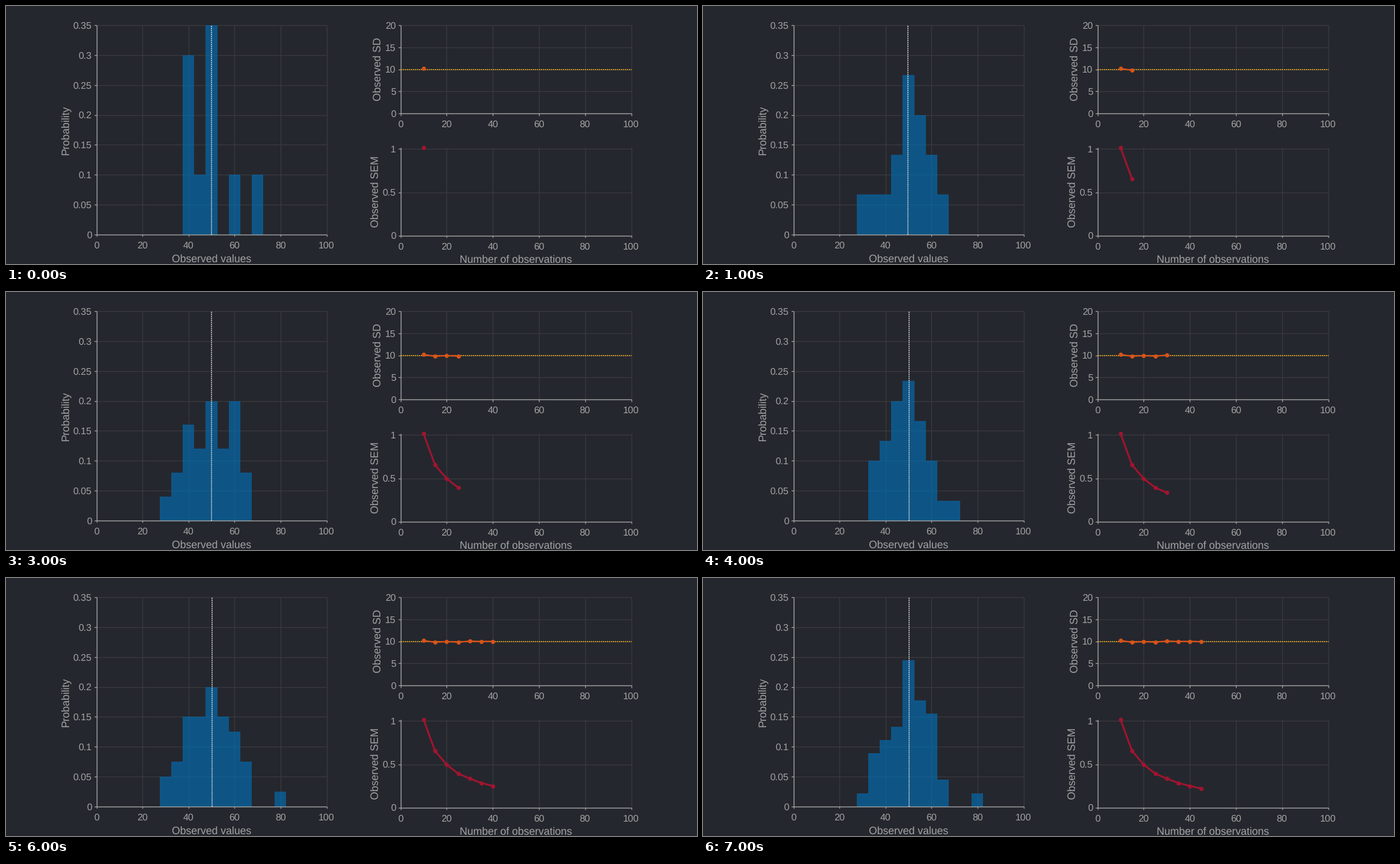
Animation of 1150 by 430 pixels, one loop 8 s. Source, as a matplotlib script:

```python
import numpy as np
import matplotlib.pyplot as plt
from matplotlib.animation import FuncAnimation

plt.rcParams["font.family"] = "Liberation Sans"
plt.rcParams["text.hinting"] = "none"
plt.rcParams["toolbar"] = "None"

W, H = 1150, 430
BG, GRID, INK = "#25272e", "#393b41", "#a3a3a3"
BLUE, ORANGE, RED, YELLOW = "#0072bd", "#d95319", "#a2142f", "#edb120"
TICK_SIZE, LABEL_SIZE = 16, 17.6

# Bin counts for each sample size, bins centred on 30, 35, ..., 80
COUNTS = {
    10: [0, 0, 3, 1, 4, 0, 1, 0, 1, 0, 0],
    15: [1, 1, 1, 2, 4, 3, 2, 1, 0, 0, 0],
    20: [0, 3, 3, 2, 2, 8, 0, 1, 1, 0, 0],
    25: [1, 2, 4, 3, 5, 3, 5, 2, 0, 0, 0],
    30: [0, 3, 4, 6, 7, 5, 3, 1, 1, 0, 0],
    35: [0, 3, 5, 5, 9, 5, 3, 3, 1, 1, 0],
    40: [2, 3, 6, 6, 8, 6, 5, 3, 0, 0, 1],
    45: [1, 4, 5, 6, 11, 8, 7, 2, 0, 0, 1],
}
SIZES = np.array(list(COUNTS))
MEANS = [49.9, 49.7, 49.9, 50.1, 50.2, 50.4, 50.3, 50.2]
SD = np.array([10.17, 9.8, 9.95, 9.82, 10.05, 9.97, 10.0, 9.93])
SEM = SD / SIZES

fig = plt.figure(figsize=(W / 72, H / 72), dpi=72, facecolor=BG)
ax = fig.add_axes([0, 0, 1, 1])
ax.axis("off")


class Panel:
    """Maps data values to stage pixels and draws grid, axes and labels."""

    def __init__(self, left, right, top, bottom, ymax, yticks, label_x, ylabel, xlabel=""):
        self.left, self.right, self.bottom = left, right, bottom
        self.top, self.ymax = top, ymax
        for v in range(0, 101, 20):
            x = self.x(v)
            self.line([x, x], [top, bottom], GRID, 1.2, 1)
            self.line([x, x], [bottom, bottom + 3.5], INK, 1.3, 4)
            ax.text(x, bottom + 23.3, str(v), size=TICK_SIZE, color=INK,
                    ha="center", va="baseline")
        for v in yticks:
            y = self.y(v)
            self.line([left, right], [y, y], GRID, 1.2, 1)
            self.line([left - 3.5, left], [y, y], INK, 1.3, 4)
            ax.text(left - 7.7, y + 5.7, f"{v:g}", size=TICK_SIZE, color=INK,
                    ha="right", va="baseline")
        self.line([left, left, right], [top, bottom, bottom], INK, 1.4, 4)
        ax.text(label_x, (top + bottom) / 2, ylabel, size=LABEL_SIZE, color=INK,
                rotation=90, rotation_mode="anchor", ha="center", va="baseline")
        ax.text((left + right) / 2, bottom + 45.7, xlabel, size=LABEL_SIZE,
                color=INK, ha="center", va="baseline")

    def line(self, x, y, color, width, z, **style):
        return ax.plot(x, y, color=color, lw=width, zorder=z,
                       solid_capstyle="butt", **style)[0]

    def x(self, v):
        return self.left + (self.right - self.left) * np.asarray(v) / 100

    def y(self, v):
        return self.bottom - (self.bottom - self.top) * np.asarray(v) / self.ymax


hist = Panel(150.5, 533.5, 32.2, 380.7, 0.35, np.arange(8) * 0.05, 104,
             "Probability", "Observed values")
sd = Panel(656.5, 1040.5, 32.2, 179, 20, range(0, 21, 5), 624.3, "Observed SD")
sem = Panel(656.5, 1040.5, 236, 382.6, 1.017, [0, 0.5, 1], 619.5,
            "Observed SEM", "Number of observations")

dots = dict(linestyle=(0, (1, 0.85)), dash_capstyle="butt")
bars = ax.stairs(np.full(11, hist.bottom), hist.x(27.5 + 5 * np.arange(12)),
                 baseline=hist.bottom, fill=True, color=BLUE, alpha=0.62,
                 linewidth=0, zorder=2)
mean_line = hist.line([0, 0], [hist.bottom, hist.top], "#dcdcdc", 1.8, 5, **dots)
sd.line([sd.left, sd.right], [sd.y(10)] * 2, YELLOW, 1.8, 5, **dots)
marker = dict(marker="o", ms=7, mew=0)
sd_curve = sd.line([], [], ORANGE, 2.3, 6, **marker)
sem_curve = sem.line([], [], RED, 3, 6, **marker)

ax.set_xlim(0, W)
ax.set_ylim(H, 0)


def update(i):
    n = SIZES[i]
    share = np.array(COUNTS[n]) / n
    bars.set_data(values=hist.y(np.minimum(share, hist.ymax)))
    mean_line.set_xdata([hist.x(MEANS[i])] * 2)
    seen = SIZES[:i + 1]
    sd_curve.set_data(sd.x(seen), sd.y(SD[:i + 1]))
    sem_curve.set_data(sem.x(seen), sem.y(SEM[:i + 1]))
    return bars, mean_line, sd_curve, sem_curve


anim = FuncAnimation(fig, update, frames=len(SIZES), interval=1000,
                     repeat=True, repeat_delay=0, blit=False)
plt.show()
```
